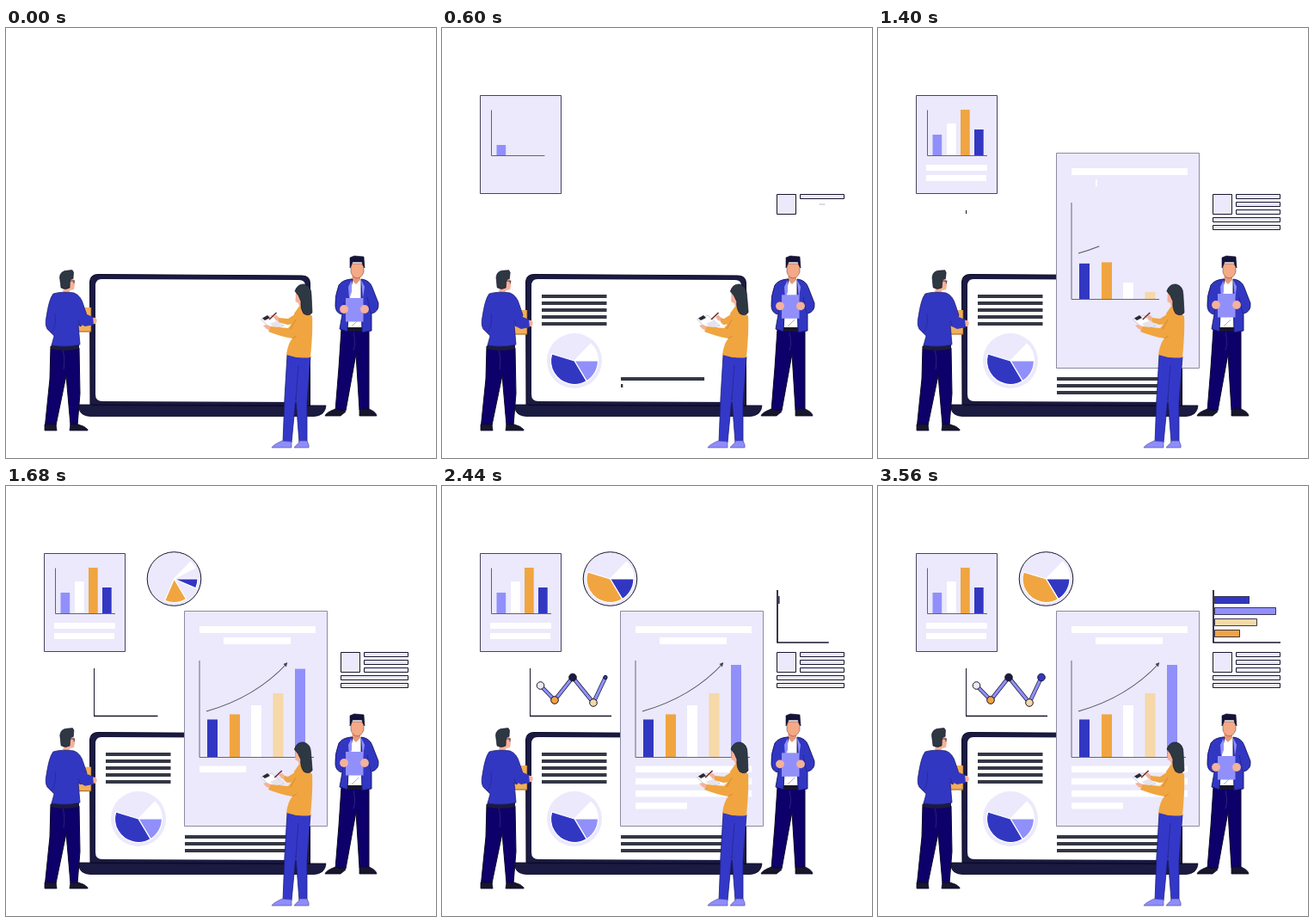
An HTML page with a canvas that plays this animation: 500 px wide and 500 px high, repeating every 3.6 s.

```html
<!DOCTYPE html>
<html lang="en">
<head>
<meta charset="utf-8">
<title>Team report</title>
<style>
html, body { margin: 0; width: 100%; height: 100%; overflow: hidden; background: #fff; }
canvas { display: block; width: 500px; height: 500px; }
</style>
</head>
<body>
<canvas id="stage"></canvas>
<script>
const LOOP = 3600, STEP = 40;
const C = {
  lilac: '#ebe9fb', violet: '#9190fb', blue: '#3237c2', orange: '#f0a541', peach: '#f6d8a9',
  navy: '#1b1a41', pants: '#0e006a', slate: '#343743', hair: '#2e3842', skin: '#f5b299', white: '#fff', ink: '#17162b',
  rim: '#0b0a26'
};
const canvas = document.getElementById('stage');
const ctx = canvas.getContext('2d');
const dpr = window.devicePixelRatio || 1;
canvas.width = canvas.height = 500 * dpr;

const lerp = (a, b, p) => a + (b - a) * p;
const wave = (t, period) => (1 - Math.cos(2 * Math.PI * t / period)) / 2;
function ease(t, start, dur) {
  const p = Math.min(1, Math.max(0, (t - start) / dur));
  return p * p * (3 - 2 * p);
}

function shape(d, fill, stroke, width = 1) {
  const path = new Path2D(d);
  if (fill) { ctx.fillStyle = fill; ctx.fill(path); }
  if (stroke) { ctx.strokeStyle = stroke; ctx.lineWidth = width; ctx.stroke(path); }
}
function box(x, y, w, h, fill, stroke) {
  if (w <= 0 || h <= 0) return;
  ctx.fillStyle = fill;
  ctx.fillRect(x, y, w, h);
  if (stroke) {
    ctx.strokeStyle = stroke;
    ctx.lineWidth = 1;
    ctx.strokeRect(x + .5, y + .5, Math.max(0, w - 1), Math.max(0, h - 1));
  }
}
function dot(x, y, r, fill, stroke) {
  if (r <= 0) return;
  ctx.beginPath();
  ctx.arc(x, y, r, 0, 7);
  ctx.fillStyle = fill;
  ctx.fill();
  if (stroke) { ctx.strokeStyle = stroke; ctx.lineWidth = 1; ctx.stroke(); }
}
// Strokes the first part of a path; len is its full length.
function trace(d, len, p, color, width = 1) {
  if (p <= 0) return;
  ctx.setLineDash([len * p, 1000]);
  shape(d, null, color, width);
  ctx.setLineDash([]);
}
function about(x, y, scale, angle, draw) {
  if (scale <= 0) return;
  ctx.save();
  ctx.translate(x, y);
  ctx.rotate(angle);
  ctx.scale(scale, scale);
  ctx.translate(-x, -y);
  draw();
  ctx.restore();
}
function shifted(x, y, draw) {
  ctx.save();
  ctx.translate(x, y);
  draw();
  ctx.restore();
}

function pie(x, y, r, t, start, main, side, edge) {
  about(x, y, ease(t, start, 200), 0, () => dot(x, y, r, C.lilac, edge));
  const p = ease(t, start + 80, 280), rad = Math.PI / 180;
  if (!p) return;
  for (const [from, to, fill] of [[-46, 0, C.white], [0, 59, side], [59, 197, main]]) {
    ctx.beginPath();
    ctx.moveTo(x, y);
    ctx.arc(x, y, 27.5, from * rad, lerp(from, to, p) * rad);
    ctx.closePath();
    ctx.fillStyle = fill;
    ctx.fill();
    ctx.strokeStyle = C.white;
    ctx.lineWidth = 1.2;
    ctx.stroke();
  }
}

function laptop(t) {
  shape('M97.500 295Q98 286.500 107 286.500L344 288Q353.500 288 353.500 297V440H98Z', C.navy, C.rim);
  shape('M104 300Q104 292 111 292L341 293Q348 293 348 300L347 435L112 434Q104 434 104 426Z', C.white);
  shape('M85 438L372 439Q371 451 358 451.500H98Q87 451 85 443Z', C.navy, C.rim, .8);
  shape('M100 438.500L354 439.500', null, C.rim);
  for (let i = 0; i < 5; i++) box(116, 310 + i * 8, 75.500 * ease(t, 60 + i * 80, 180), 4, C.slate);
  pie(154, 387, 32, t, 220, C.blue, C.violet);
  [430, 580, 720].forEach((s, i) => box(208, 406 + i * 8, 128 * ease(t, s, 250), 4, C.slate));
}

function leftCard(t) {
  about(91.500, 135.500, ease(t, 20, 340), 0, () => box(44, 78, 95, 115, C.lilac, '#45445a'));
  [[63.500, 24, C.violet], [80, 37, C.white], [96, 53, C.orange], [112, 30, C.blue]].forEach(([x, h, fill], i) => {
    const k = h * ease(t, 520 + i * 80, 160);
    box(x, 148 - k, 10.700, k, fill);
  });
  trace('M57.500 95.500V148.500H127', 122.5, ease(t, 320, 330), '#62626c');
  box(56, 159, 71 * ease(t, 820, 150), 7, C.white);
  box(56, 171, 70 * ease(t, 920, 150), 7, C.white);
}

function rightList(t) {
  about(401, 205, ease(t, 60, 340), 0, () => box(389, 193, 23, 24, C.lilac, C.ink));
  for (let i = 0; i < 5; i++) {
    const [x, w] = i > 2 ? [389, 79] : [416, 52], y = 193 + i * 9;
    about(x + w / 2, y + 3, ease(t, 400 + i * 160, 180), 0, () => box(x, y, w, 6, C.lilac, C.ink));
  }
}

function report(t) {
  about(290.500, 270.500, ease(t, 980, 300), 0, () => {
    box(207, 145, 167, 251, C.lilac, '#8b8a9f');
    box(225, 163, 135 * ease(t, 1030, 230), 8, C.white);
    box(253, 176, 78 * ease(t, 1375, 260), 8, C.white);
    const bars = [[234, 43.5, C.blue, 1125], [260, 49.5, C.orange, 1155], [285, 60, C.white, 1280],
      [310.500, 74, C.peach, 1335], [336, 107, C.violet, 1400]];
    for (const [x, h, fill, start] of bars) {
      const k = h * ease(t, start, 320);
      box(x, 315 - k, 12, k, fill);
    }
    trace('M225 203V315.500H358', 245.5, ease(t, 840, 720), '#666674');
    const p = ease(t, 1270, 420);
    trace('M233 262Q290 246 327 206', 112, p, '#555560', 1.100);
    if (p > .98) shape('M327 205L322.500 207L326 210.500Z', '#444450');
    [135, 135, 135, 60].forEach((w, i) => box(225, 325.500 + i * 14.200, w * ease(t, 1580 + i * 180, 230), 7.500, C.white));
  });
}

function lineChart(t) {
  trace('M102.500 212V268', 56, ease(t, 1360, 240), C.ink);
  trace('M102 267.500H197', 95, ease(t, 1540, 200), C.ink, 1.700);
  const pts = [[114.500, 232, C.lilac], [131, 249, C.orange], [152, 222.500, C.navy], [176, 252, C.peach], [190, 222.500, C.blue]];
  for (let i = 0; i < 4; i++) {
    const [x, y] = pts[i], [u, v] = pts[i + 1];
    const p = ease(t, 1760 + i * 165, 170), d = `M${x} ${y}L${u} ${v}`, len = Math.hypot(u - x, v - y);
    trace(d, len, p, C.ink, 4.600);
    trace(d, len, p, C.violet, 3.200);
  }
  pts.forEach(([x, y, fill], i) => dot(x, y, 4.300 * ease(t, 1720 + i * 165, 120), fill, C.ink));
}

function barList(t) {
  trace('M390 121V182H468', 139, ease(t, 2270, 220), C.ink, 1.700);
  [[41, C.blue], [72, C.violet], [50, C.peach], [30, C.orange]].forEach(([w, fill], i) =>
    box(391, 128 + i * 13, w * ease(t, 2420 + i * 70, 180), 9, fill, '#3b3655'));
}

function leftMan(t) {
  const m = ease(t, 0, 560) * (1 - ease(t, 1420, 560));
  shifted(0, 3 * m, () => {
    box(84, 325, 15, 28.500, '#f2ae58');
    shape('M84 353H99V325', null, '#6d4b27', .7);
  });
  shape('M52 370Q68 376 85 372L86 425L83 462H75L70 404L58 462H45.500L51 408Z', C.pants, C.rim);
  shape('M66 375Q69 384 67 397', null, '#34308a', .7);
  shape('M45 461H58L59 468H45Z', C.ink, C.rim, .8);
  shape('M75 461H84Q92 463 95 467V468H74Z', C.ink, C.rim, .8);
  shape('M53 368Q69 371 85 368V373Q68 377 52 373Z', '#1c1b3a');
  about(72, 307, 1, .03 * m, () => {
    shape('M72 289L78.500 290L80 298L79 304L74.500 305L73 309H66L67 301Z', C.skin);
    shape('M62.500 290Q63 282 72 282L77 281.500L78.500 284L78 291L74.500 293L74 302Q69 305 64 302Z', C.hair, C.rim, .6);
    shape('M74 294H80M79 294V297', null, C.ink, .8);
  });
  shape('M55 309Q65 306 79 308Q87 311 90 322L94 334L87 347L84 345L86 368Q70 372 53 369L56 358L48 350Q45 345 47 336Q50 315 55 309Z', C.blue, '#1c1f78', .8);
  shifted(0, 3 * m, () => {
    dot(102, 340.500, 3.700, C.skin);
    shape('M88 328L94 333L101 336L102 345L92 347L82 342Z', C.blue);
  });
  shape('M57 332Q59 346 53 354M84 340L86 346', null, '#252993', .8);
}

function woman(t) {
  const w = wave(t, 1200), dx = 7 * w;
  shape('M327 380Q340 385 354 382L350 435L350 482H341L337 430L332 482H322L324 430Z', '#3438c8', '#1c1f78', .8);
  shape('M337 431L340 392', null, '#22268e', .8);
  shape('M321 480L332 481V488H309Q310 485 321 480Z', '#8f8df9', '#4a49a0', .6);
  shape('M341 480H350Q353 485 352 488H335Q338 484 341 482Z', '#8f8df9', '#4a49a0', .6);
  // Clipboard and calculator
  shape('M296.500 339L309 334L323 346L309 350Z', C.white, '#b9b9c2', .7);
  shape('M307 344L316 340L321 346L311 348Z', '#e4e3ef');
  shape('M298 337.500L304 334L307 337L301 340Z', '#292936');
  shifted(dx, 0, () => {
    shape('M319 338L314 333.500L311 336L314 340L320 342Z', C.skin);
    shape('M306 339L314.500 331', null, '#733330', 1.700);
  });
  shape(`M${317 + dx} 337L328 338L342 329L339 344L327 345L${317 + dx} 342Z`, C.orange);
  shape('M302 345L309 347L308 352L303 350L299 346Z', C.skin);
  shape('M342 322Q349 329 356 335Q357 352 354 383Q340 385 326 380Q328 366 333 361Q317 358 305 353L308 347L328 349L335 341L335 332Z', C.orange);
  shape('M331 350L337 339M333 361L338 358', null, '#cf8526', .8);
  about(346, 326, 1, -.035 * w, () => {
    shape('M337 308L345 309L347 324L341 324L340 320L336.500 318Z', C.skin);
    shape('M336 306Q339 297 347 298Q355 300 355 310L356 331Q352 336 346 332Q342 326 343 318L340 311Z', C.hair, C.rim, .6);
  });
}

function rightMan(t) {
  const lift = -5 * ease(t, 0, 900) * (1 - ease(t, 2100, 1000));
  shape('M390 350H422V444H411L407 379L395 445H383L387 395Z', C.pants, C.rim);
  shape('M404 354Q407 367 404 375', null, '#34308a', .7);
  shape('M383 443L395 446L389 451H371Q372 447 383 443Z', C.ink, C.rim, .8);
  shape('M411 443H422Q430 446 431 451H411Z', C.ink, C.rim, .8);
  shape('M399 292H414L415 350H396Z', C.white);
  shape('M396 348H414V353H396Z', C.ink);
  shape('M403 286H412V293L407 298L402 293Z', '#eb987a');
  shape('M401 274H416V284Q413 291 408 291Q403 290 401 284Z', '#f4a987', '#5b3a35', .5);
  shape('M400 279L400 267L405 265L416 266L417 279L415 276L414 272H403L401 277Z', '#15133a', C.rim, .6);
  shape('M401 292Q391 293 387 299Q382 312 383 324Q384 332 391 333L388 350L397 353L399 313L403 292Z', C.blue, '#14165f', .9);
  shape('M413 292Q423 293 426 302L433 320Q434 330 425 332V352L414 354L413 313Z', C.blue, '#14165f', .9);
  shape('M402 293L398 301L399 315L402 307M413 293L417 301L415 314Z', C.violet);
  shape('M391 333L393 319M424 332L420 313', null, '#20238a', .8);
  shape('M402 347L410 339', null, '#77777f', .6);
  shifted(0, lift, () => {
    box(395, 314, 20.500, 27.500, C.violet);
    dot(393, 327, 4.900, C.skin);
    dot(417, 327, 4.900, C.skin);
  });
}

function draw(t) {
  ctx.setTransform(dpr, 0, 0, dpr, 0, 0);
  ctx.fillStyle = C.white;
  ctx.fillRect(0, 0, 500, 500);
  ctx.lineJoin = 'round';
  laptop(t);
  leftCard(t);
  rightList(t);
  report(t);
  pie(195.500, 108, 31.300, t, 1480, C.orange, C.blue, C.ink);
  lineChart(t);
  barList(t);
  leftMan(t);
  woman(t);
  rightMan(t);
}

const origin = performance.now();
function tick(now) {
  const t = Math.max(0, now - origin) % LOOP;
  draw(Math.floor(t / STEP) * STEP);
  requestAnimationFrame(tick);
}
draw(0);
requestAnimationFrame(tick);
</script>
</body>
</html>
```
